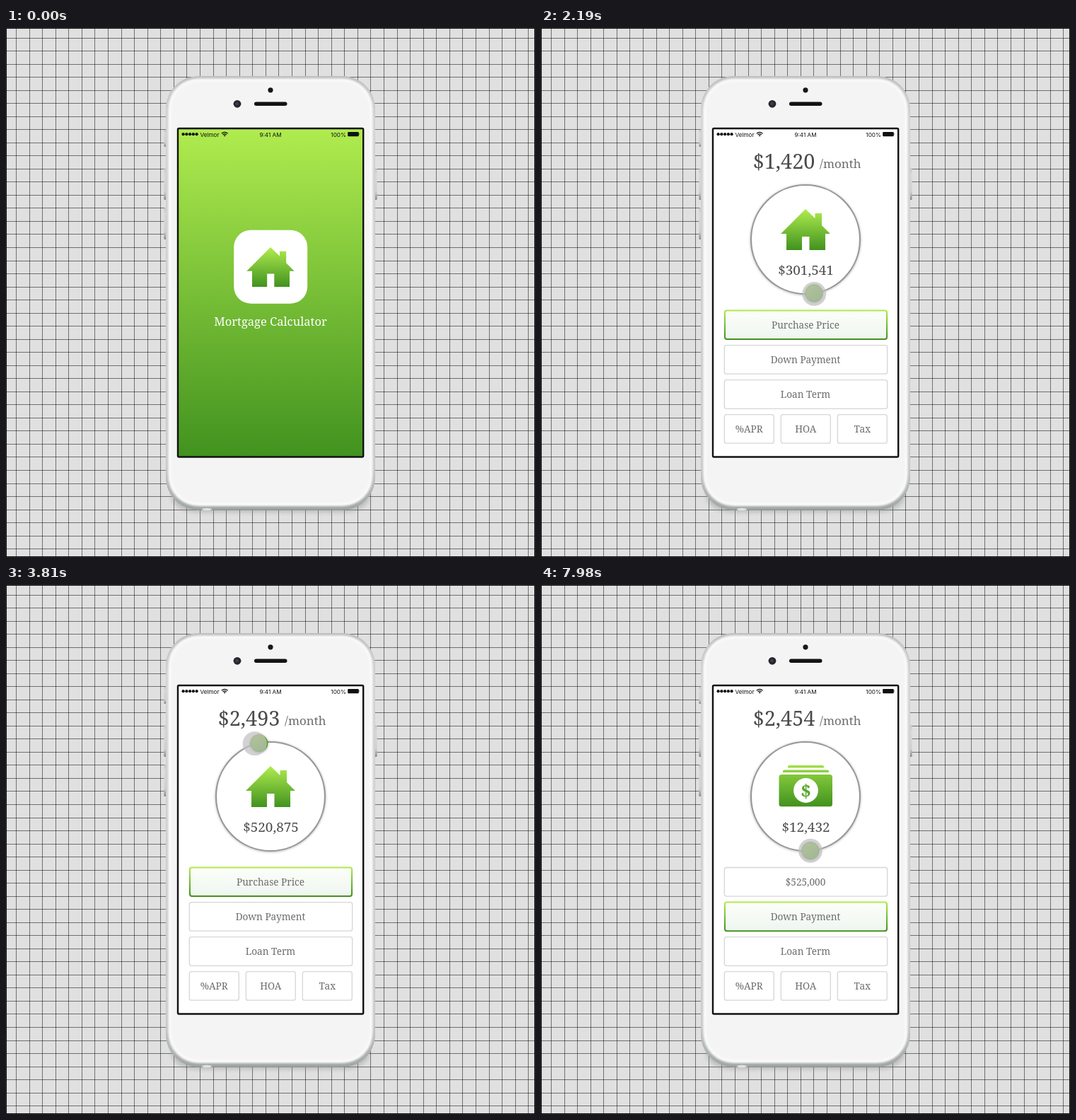
Recreate the animation shown at these times as an HTML page. Size 748 px wide and 748 px high, loop 8 s.

```html
<!DOCTYPE html>
<html lang="en">
<head>
<meta charset="utf-8">
<title>Mortgage Calculator</title>
<style>
  html, body { margin: 0; width: 100%; height: 100%; overflow: hidden; background: #e0e0e0; }
  svg { display: block; width: 100vw; height: 100vh; }
  text { font-family: "Noto Serif", serif; text-anchor: middle; }
  .status text { font-family: Inter, "Liberation Sans", sans-serif; font-size: 8.2px; fill: #111; }
  .label { font-size: 13.6px; font-weight: 300; fill: #6c6c6c; }
  .box { fill: #fff; stroke: #d6d6d6; stroke-width: 1.3; }
  .active { fill: url(#tint); stroke: url(#green); stroke-width: 2; }
</style>
</head>
<body>
<svg viewBox="0 0 748 748">
  <defs>
    <linearGradient id="green" x2="0" y2="1">
      <stop stop-color="#b0ec4f"/><stop offset="1" stop-color="#41921f"/>
    </linearGradient>
    <linearGradient id="bill" x2="0" y2="1">
      <stop stop-color="#83c83b"/><stop offset="1" stop-color="#41921f"/>
    </linearGradient>
    <linearGradient id="dialFill" x1=".1" y1=".1" x2=".8" y2="1">
      <stop stop-color="#8acb40"/><stop offset="1" stop-color="#56a52b"/>
    </linearGradient>
    <linearGradient id="tint" x2="0" y2="1">
      <stop stop-color="#fcfef9"/><stop offset="1" stop-color="#eef6ef"/>
    </linearGradient>
    <linearGradient id="rim" x2="0" y2="1">
      <stop stop-color="#bcbebd"/><stop offset=".1" stop-color="#d0d1d1"/>
      <stop offset=".9" stop-color="#c6c8c7"/><stop offset="1" stop-color="#9fa5a1"/>
    </linearGradient>
    <linearGradient id="key" x2="0" y2="1">
      <stop stop-color="#c4c6c5"/><stop offset=".2" stop-color="#d8d9d9"/>
      <stop offset=".75" stop-color="#cfd0d0"/><stop offset="1" stop-color="#858887"/>
    </linearGradient>
    <filter id="soft"><feGaussianBlur stdDeviation="1.6"/></filter>
    <filter id="shade" x="-10%" y="-10%" width="120%" height="120%"><feGaussianBlur stdDeviation="3"/></filter>
    <path id="house" d="M374 256L387.5 269V262H397V279L409 291H402V314H379.5V295H369V314H347V291H339Z" fill="url(#green)"/>
  </defs>

  <rect width="748" height="748" fill="#e0e0e0"/>
  <path id="grid" stroke="#000" stroke-opacity=".5" fill="none"/>
  <rect x=".5" y=".5" width="747" height="747" fill="none" stroke="#111"/>

  <g id="phone">
    <rect x="234" y="640" width="280" height="45" rx="38" fill="#8b948f" opacity=".45" filter="url(#shade)"/>
    <g fill="url(#key)">
      <rect x="223.3" y="144" width="5" height="24" rx="1.5"/>
      <rect x="223.3" y="198" width="5" height="45" rx="1.5"/>
      <rect x="223.3" y="254" width="5" height="45" rx="1.5"/>
      <rect x="519.7" y="198" width="5" height="45" rx="1.5"/>
    </g>
    <rect x="226" y="68" width="296" height="613.5" rx="46" fill="url(#rim)"/>
    <rect x="229.5" y="71.5" width="289" height="604.5" rx="43" fill="#fdfdfd" filter="url(#soft)"/>
    <rect x="233" y="75" width="282" height="597" rx="39" fill="#f4f4f4" filter="url(#soft)"/>
    <ellipse cx="284" cy="680.5" rx="7" ry="1.8" fill="#dfe2e0"/>
    <circle cx="374" cy="87.8" r="3.6" fill="#17171a"/>
    <circle cx="327" cy="107.3" r="5.4" fill="#25272c"/>
    <circle cx="326.6" cy="107" r="2.2" fill="#3d4048"/>
    <rect x="351" y="104.6" width="46.5" height="5.4" rx="2.7" fill="#131316"/>
    <rect x="243" y="142" width="262" height="464.5" fill="#fff"/>
  </g>

  <g id="dash">
    <text id="month" x="343.5" y="199" font-size="28.8" fill="#4a4a4a"></text>
    <text x="423.3" y="198" font-size="17" font-weight="300" fill="#6c6c6c">/month</text>
    <circle cx="374" cy="299.6" r="77" fill="none" stroke="#777" stroke-width="3" opacity=".45" filter="url(#soft)"/>
    <circle cx="374" cy="299" r="77" fill="#fff" stroke="#999" stroke-width="2.2"/>
    <g id="price">
      <use href="#house"/>
      <text id="priceValue" x="374.5" y="349" font-size="18.9" fill="#4a4a4a"></text>
    </g>
    <g id="down">
      <path d="M349 258.5V257Q349 255 351 255H398Q400 255 400 257V258.5Z" fill="#9fde48"/>
      <path d="M342 265V263.5Q342 261.5 344 261.5H405Q407 261.5 407 263.5V265Z" fill="#8fd040"/>
      <rect x="336.5" y="268" width="75.5" height="45.3" rx="3.5" fill="url(#bill)"/>
      <circle cx="374.5" cy="290.5" r="17.4" fill="#fff"/>
      <text x="374.5" y="299.7" font-size="26" font-weight="700" fill="#5aa82c">$</text>
      <text id="downValue" x="374.5" y="349" font-size="18.9" fill="#4a4a4a"></text>
    </g>
    <g id="buttons"></g>
    <g id="dial">
      <circle r="13" cy=".8" fill="#555" opacity=".45" filter="url(#soft)"/>
      <circle r="12.2" fill="url(#dialFill)" stroke="#4d9428" stroke-width=".8"/>
    </g>
  </g>

  <g id="splash">
    <rect x="243" y="142" width="262" height="464.5" fill="url(#green)"/>
    <rect x="322.2" y="285.7" width="104" height="104" rx="24" fill="#fff"/>
    <use href="#house" transform="translate(374 310) scale(.964) translate(-374 -256)"/>
    <text x="374" y="420.7" font-size="16.5" fill="#fff">Mortgage Calculator</text>
  </g>

  <rect x="243" y="142" width="262.2" height="464.5" rx="1.5" fill="none" stroke="#111" stroke-width="2.4"/>

  <g class="status">
    <g id="signal" fill="#111"></g>
    <text x="288" y="153.8">Velmor</text>
    <path d="M304.8 149.2Q309.2 145.4 313.6 149.2M306.6 151Q309.2 148.8 311.8 151" fill="none" stroke="#111" stroke-width="1.2"/>
    <path d="M307.8 151.9Q309.2 150.8 310.6 151.9L309.2 153.4Z" fill="#111"/>
    <text x="374" y="153.8">9:41 AM</text>
    <text x="481" y="153.8" style="text-anchor:end">100%</text>
    <rect x="483.2" y="147" width="15.6" height="6.2" rx="1.2" fill="#111"/>
    <path d="M499.3 148.8q1.4 1.3 0 2.6z" fill="#111"/>
  </g>

  <circle id="touch" fill="#c0bfc0" fill-opacity=".7"/>
</svg>

<script>
const LOOP = 8000, START_PRICE = 300000, END_PRICE = 525000;
const $ = id => document.getElementById(id);
const clamp = x => Math.min(1, Math.max(0, x));
const span = (t, a, b) => clamp((t - a) / (b - a));
const money = v => '$' + Math.round(v).toLocaleString('en-US');

// Piecewise linear lookup through [x, y] points.
function lerpKeys(keys, x) {
  let i = 1;
  while (i < keys.length - 1 && x > keys[i][0]) i++;
  const [x0, y0] = keys[i - 1], [x1, y1] = keys[i];
  return y0 + (y1 - y0) * span(x, x0, x1);
}

// Smooth monotone curve through [x, y] points, flat at both ends.
function smoothKeys(keys, x) {
  const slope = i => (keys[i + 1][1] - keys[i][1]) / (keys[i + 1][0] - keys[i][0]);
  const tangent = i => {
    if (i === 0 || i === keys.length - 1) return 0;
    const a = slope(i - 1), b = slope(i);
    return a * b > 0 ? 2 * a * b / (a + b) : 0;
  };
  let i = 0;
  while (i < keys.length - 2 && x > keys[i + 1][0]) i++;
  const [x0, y0] = keys[i], [x1, y1] = keys[i + 1];
  const u = span(x, x0, x1), v = 1 - u, h = x1 - x0;
  return y0 * v * v * (1 + 2 * u) + y1 * u * u * (3 - 2 * u)
    + h * u * v * (v * tangent(i) - u * tangent(i + 1));
}

// The standard "ease" curve: cubic-bezier(.25, .1, .25, 1).
function ease(x) {
  if (x <= 0 || x >= 1) return clamp(x);
  const bez = (a, b, s) => 3 * a * s * (1 - s) ** 2 + 3 * b * s * s * (1 - s) + s ** 3;
  let lo = 0, hi = 1;
  for (let i = 0; i < 24; i++) {
    const mid = (lo + hi) / 2;
    if (bez(.25, .25, mid) < x) lo = mid; else hi = mid;
  }
  return bez(.1, 1, lo);
}

// Degrees the dial has turned counterclockwise from the bottom, over time.
const turnKeys = [[1590, 0], [2190, 9], [2370, 41], [2580, 102], [2970, 260],
                  [3180, 348], [3500, 475], [3810, 552], [4020, 570]];
const leadKeys = [[2190, 0], [2500, 4], [2970, 4.5], [3810, 4.5], [4020, 0]];
const priceKeys = [[0, START_PRICE], [9, 301529], [260, 401628], [552, 520846], [570, END_PRICE]];
const monthKeys = [[0, 1400], [9, 1420], [260, 1950], [552, 2493], [570, 2500]];
const tapKeys = [[5519.9, 0], [5520, .34], [5610, .34], [5700, 1], [5760, 1], [5940, 0]];

function onRing(turn, radius = 77) {
  const a = (90 - turn) * Math.PI / 180;
  return [374 + radius * Math.cos(a), 299 + radius * Math.sin(a)];
}

function buildGrid() {
  let d = '';
  for (let i = 0; i < 40; i++) {
    const x = Math.round(14 + 18.57 * i) + .5;
    const y = Math.floor(14 + 18.53 * i) + .5;
    d += `M0 ${y}H748M${x} 0V748`;
  }
  $('grid').setAttribute('d', d);
}

function buildButtons() {
  const box = (x, y, w, cls, id = '') =>
    `<rect ${id && `id="${id}"`} class="${cls}" x="${x}" y="${y}" width="${w}" height="40.6" rx="3"/>`;
  const label = (x, y, text, id = '') =>
    `<text ${id && `id="${id}"`} class="label" x="${x}" y="${y + 25}">${text}</text>`;
  const rows = [399.5, 448.6, 497.7, 546.6];
  let html = rows.slice(0, 3).map(y => box(259.3, y, 230.4, 'box')).join('');
  html += box(260, rows[0], 229, 'active', 'priceActive') + box(260, rows[1], 229, 'active', 'downActive');
  html += label(374, rows[0], 'Purchase Price', 'priceLabel') + label(374, rows[0], money(END_PRICE), 'priceDone');
  html += label(374, rows[1], 'Down Payment') + label(374, rows[2], 'Loan Term');
  ['%APR', 'HOA', 'Tax'].forEach((text, i) => {
    const x = 259.3 + i * 80;
    html += box(x, rows[3], 70, 'box') + label(x + 35, rows[3], text);
  });
  $('buttons').innerHTML = html;
}

function buildSignal() {
  $('signal').innerHTML = [0, 1, 2, 3, 4]
    .map(i => `<circle cx="${250.6 + i * 4.75}" cy="150.2" r="2.1"/>`).join('');
}

const fade = (id, value) => $(id).setAttribute('opacity', clamp(value));

function placeTouch(x, y, strength) {
  const touch = $('touch');
  touch.setAttribute('cx', x);
  touch.setAttribute('cy', y);
  touch.setAttribute('r', 17 + 3 * (1 - strength));
  fade('touch', strength);
}

function render(t) {
  const intro = ease(span(t, 480, 1320));
  fade('splash', 1 - 2 * intro);
  fade('dash', 2 * intro - 1);

  const swap = ease(span(t, 5750, 6610));
  fade('price', 1 - 2 * swap);
  fade('priceLabel', 1 - 2 * swap);
  fade('down', 2 * swap - 1);
  fade('priceDone', 2 * swap - 1);
  fade('priceActive', 1 - swap);
  fade('downActive', swap);

  const pull = span(t, 7200, 7980) ** 2;
  const dragged = smoothKeys(turnKeys, t);
  const turn = dragged * (1 - swap) + 5.2 * pull;
  const [x, y] = onRing(turn);
  $('dial').setAttribute('transform', `translate(${x} ${y})`);

  $('priceValue').textContent = money(lerpKeys(priceKeys, dragged));
  $('downValue').textContent = money(12432 * pull);
  $('month').textContent = money(lerpKeys(monthKeys, dragged) - 46 * pull);

  if (t < 5000) {
    const strength = span(t, 1590, 1860) * (1 - span(t, 4150, 4440));
    placeTouch(...onRing(turn + lerpKeys(leadKeys, t), 78), strength);
  } else if (t < 7000) {
    placeTouch(375, 468.5, lerpKeys(tapKeys, t));
  } else {
    placeTouch(x, y, span(t, 7200, 7470));
  }
}

buildGrid();
buildButtons();
buildSignal();
const begin = performance.now();
function tick() {
  render((performance.now() - begin) % LOOP);
  requestAnimationFrame(tick);
}
tick();
</script>
</body>
</html>
```
